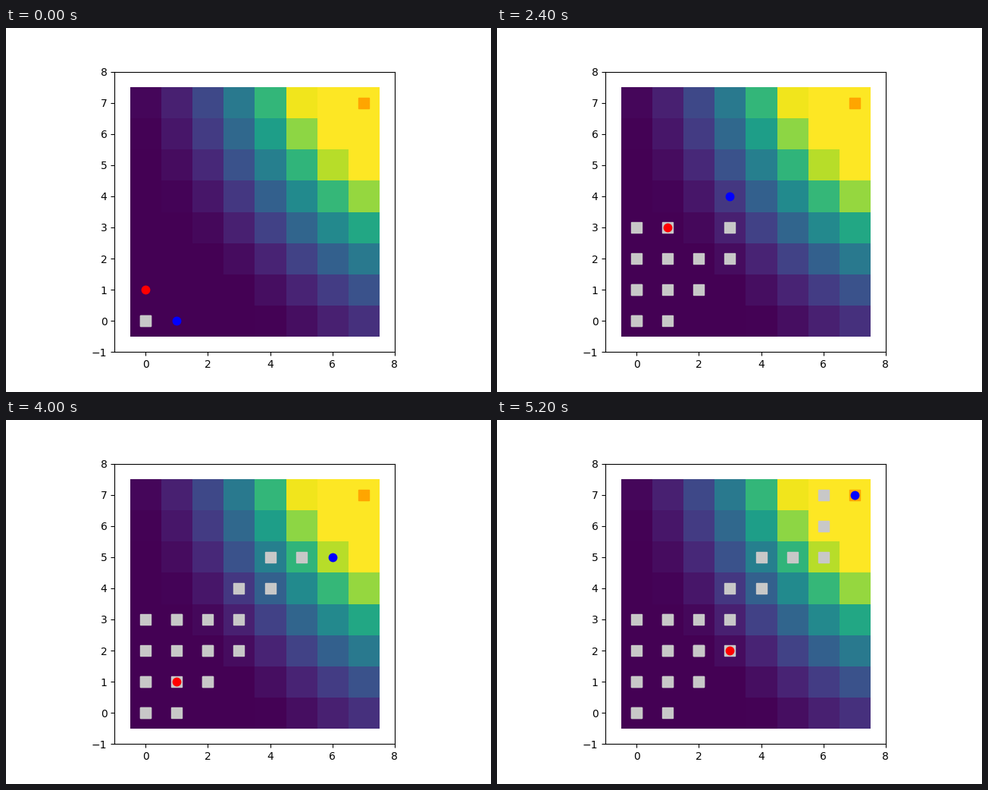
A matplotlib script that plays this animation: 640x480 px, repeating every 5600 ms.

```python
import numpy as np
import matplotlib.pyplot as plt
from matplotlib.animation import FuncAnimation

STEP_MS = 400
SIZE = 8
START = (0, 0)
GOAL = (SIZE - 1, SIZE - 1)
MOVES = {"R": (1, 0), "L": (-1, 0), "U": (0, 1), "D": (0, -1), ".": (0, 0)}


def field(n):
    """Strength that rises along the diagonal and bends off to its sides."""
    y, x = np.mgrid[:n, :n]
    along, across = x + y - n, x - y
    bend = np.exp(0.2 * along)
    ridge = 0.57 + 0.125 * along
    slope = 0.0043 * bend * (across - 2 / bend) ** 2
    return np.clip(ridge - slope, 0, 1) ** 2


def walk(moves):
    """Cells visited from START, one per move."""
    return np.cumsum([START] + [MOVES[m] for m in moves], axis=0)


seeker = walk("RURURUURURRUUR")
wanderer = walk("U.URULRRDDLURR")
steps = len(seeker) - 1

fig, ax = plt.subplots(figsize=(6.4, 4.8), dpi=100)
ax.imshow(field(SIZE), cmap="viridis", vmin=0, vmax=1, origin="lower",
          interpolation="nearest")
ax.set(xlim=(-1, SIZE), ylim=(-1, SIZE))


def marker(shape, color, size, cell=()):
    xy = ([cell[0]], [cell[1]]) if cell else ([], [])
    return ax.plot(*xy, shape, color=color, ms=size, ls="none")[0]


goal = marker("s", "orange", 10, GOAL)
trail = marker("s", "#c8c8c8", 10)
red = marker("o", "red", 7.5)
blue = marker("o", "blue", 7.5)


def update(i):
    seen = np.concatenate([seeker[:i + 1], wanderer[:i + 1]])
    trail.set_data(seen[:, 0], seen[:, 1])
    for dot, path in ((red, wanderer), (blue, seeker)):
        x, y = path[i + 1]
        dot.set_data([x], [y])
    return trail, red, blue


anim = FuncAnimation(fig, update, frames=steps, interval=STEP_MS,
                     repeat=True, repeat_delay=0)
plt.show()
```
